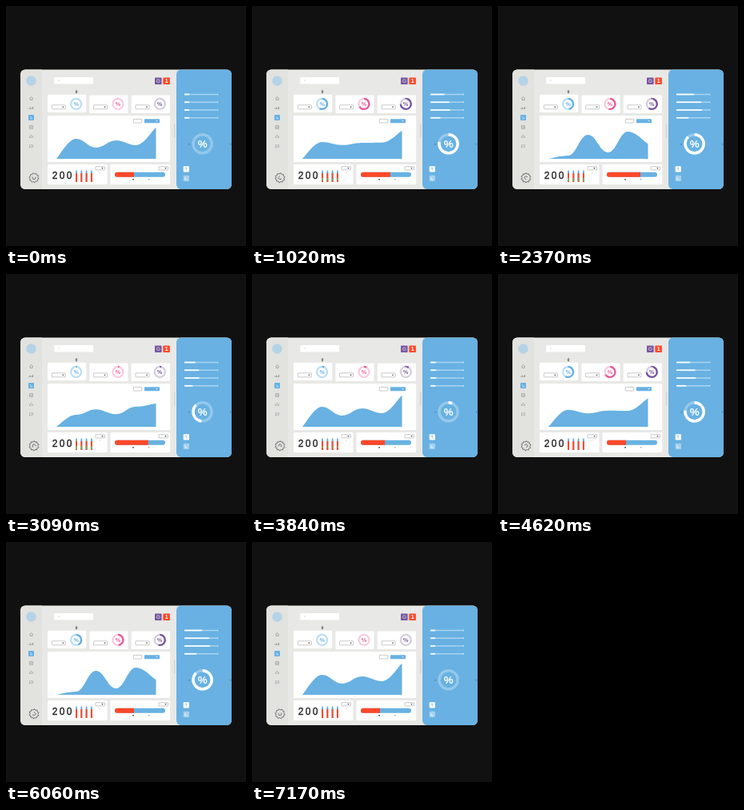
Animation, 300 px wide and 300 px high, one loop 7230 ms. Source, as an HTML page:

```html
<!DOCTYPE html>
<html lang="en">
<head>
<meta charset="utf-8">
<title>Dashboard</title>
<style>
  html, body { margin: 0; width: 100%; height: 100%; overflow: hidden; background: #111; }
  svg { display: block; width: 100%; height: 100%; }
  text { font-family: "Liberation Sans", Arial, sans-serif; }
</style>
</head>
<body>
<svg id="stage" viewBox="0 0 300 300"></svg>
<script>
const LOOP = 7230, CYCLE = LOOP / 2;
const BLUE = '#68b1e2', RED = '#ff4829', PURPLE = '#77579f', PINK = '#e85c9a', DARK = '#343434', GRAY = '#858585';
const stage = document.getElementById('stage');

function add(tag, attrs, text) {
  const el = document.createElementNS('http://www.w3.org/2000/svg', tag);
  for (const name in attrs) el.setAttribute(name, attrs[name]);
  if (text) el.textContent = text;
  return stage.appendChild(el);
}
const box = (x, y, width, height, fill, rx = 0, more = {}) =>
  add('rect', { x, y, width, height, fill, rx, ...more });
const outline = (x, y, w, h) =>
  box(x, y, w, h, '#fff', 0.4, { stroke: '#a5a5a5', 'stroke-width': 0.6 });
const line = (d, stroke, width = 0.6, more = {}) =>
  add('path', { d, stroke, 'stroke-width': width, fill: 'none', ...more });
const shape = (d, fill) => add('path', { d, fill });
const dot = (cx, cy, r, fill) => add('circle', { cx, cy, r, fill });
const label = (x, y, size, fill, text) =>
  add('text', { x, y, fill, 'font-size': size, 'font-weight': 700, 'text-anchor': 'middle' }, text);

function select(x, y, w, h) {
  outline(x, y, w, h);
  shape(`M${x + w - 4.2} ${y + h / 2 - .6}h2.4l-1.2 1.5z`, DARK);
}

function ring(cx, cy, r, width, color, track) {
  const circle = stroke => add('circle', {
    cx, cy, r, fill: 'none', stroke, 'stroke-width': width,
    pathLength: 100, transform: `rotate(-90 ${cx} ${cy})`
  });
  circle(track);
  return circle(color);
}

function setArc(arc, from, to) {
  const size = Math.max(0, to - from);
  arc.setAttribute('stroke-dasharray', `${size} ${size ? 100 - size : 200}`);
  arc.setAttribute('stroke-dashoffset', -from);
}

// Window and sidebar
box(18, 79.5, 264, 149.4, '#e8e8e6', 6);
shape('M24 79.5H45V228.9H24a6 6 0 0 1-6-6V85.5a6 6 0 0 1 6-6z', '#e2e2df');
box(213, 79.5, 69, 149.4, BLUE, 6);
dot(31.5, 93.5, 6.2, '#b5d3e7');

line('M29.4 115.6l2.2-2 2.2 2M30.2 115.2v2.3h2.8v-2.3', GRAY);
line('M29 129v-1.6M30.6 129v-2.4M32.2 129v-1.6M33.6 129v-3', GRAY, 0.8);
box(28, 136, 7, 7, BLUE, 0.8);
line('M30 138l3 3M30.2 141h2.6', '#fff', 0.5);
line('M29.6 149.6h3.8v3.8h-3.8zM30.4 151.5h2.2', GRAY);
line('M29.6 165v-2l1.9-1.6 1.9 1.6v2M31.5 165v-1.5', GRAY);
line('M29.5 177.3v-3.5h4v2.5h-2.6z', '#999');

// A tooth is two steps out and two steps in
const gear = line('M33.2 213.6v1.4a1.8 1.8 0 0 0 3.6 0v-1.4' + Array.from({ length: 40 }, (_, i) => {
  const a = (i + .5) * Math.PI / 20, r = i % 4 < 2 ? 6 : 4.9;
  return `${i ? 'L' : 'M'}${35 + r * Math.cos(a)} ${214.8 + r * Math.sin(a)}`;
}).join('') + 'Z', '#4a4a4a', 0.7);

// Top bar
box(60.3, 89, 48.7, 8.6, '#fff', 0.6);
add('circle', { cx: 66, cy: 93, r: 0.8, fill: 'none', stroke: '#ccc', 'stroke-width': 0.4 });
box(186, 89.6, 8.6, 8.5, PURPLE, 0.8);
add('circle', { cx: 190.3, cy: 93.7, r: 1.9, fill: 'none', stroke: '#e6def0', 'stroke-width': 0.7 });
box(196.3, 89.6, 8.6, 8.5, RED, 0.8);
label(200.6, 96.3, 7, '#fff', '1');

// Cards
const rings = [[BLUE, '#bcdff5'], [PINK, '#f8cddd'], [PURPLE, '#d6cedf']].map(([color, track], i) => {
  const x = 52 + i * 52.35, y = i ? 111.6 : 110.7;
  box(x, y, 48.2, 22.4, '#fff', 1);
  select(x + 5.3, 123.8, 17, 5);
  const arc = ring(x + 35.6, 122.4, 6.5, 2.4, color, track);
  label(x + 35.6, 125, 7.2, color, '%');
  return arc;
});
shape('M86.5 106.7l1.5-1.8 1.5 1.8zM86.5 107.6l1.5 1.8 1.5-1.8z', '#555');

box(52, 137, 153.2, 58, '#fff', 1);
outline(159.3, 141.4, 10.4, 4.6);
box(173, 141.2, 19, 5, BLUE, 0.5);
shape('M187.4 143.2h2.2l-1.1 1.3z', '#fff');
const area = shape('', BLUE);

box(52, 198, 74.5, 25, '#fff', 1);
select(112, 200.7, 11.5, 4.2);
add('text', {
  x: 57.7, y: 216.4, 'font-size': 12, 'letter-spacing': 2.3, fill: '#222', stroke: '#222', 'stroke-width': 0.35
}, '200');
dot(117.7, 208, 0.5, '#aaa');
const bars = [0, 1, 2, 3].map(i => {
  const x = 88 + i * 6.3;
  shape(`M${x - 1} 220V207l1-2.4 1 2.4V220z`, BLUE);
  return { x, red: line('', RED, 2), green: line('', '#7fae62', 2) };
});

box(130.5, 198, 74.7, 25, '#fff', 1);
select(191, 200.7, 11.5, 4.2);
box(136, 207.7, 63, 6.1, BLUE, 3);
const meter = shape('', RED);
dot(159, 216.8, 0.9, DARK);
dot(178.7, 216.8, 0.7, GRAY);
box(210, 147, 1.3, 17.5, '#d2d2d0', 0.6);

// Side panel
const sliders = [16, 25, 26, 9].map((reach, i) => {
  const y = 110.5 + i * 9.75;
  line(`M223 ${y}H265`, '#a9d3ef', 1.4);
  const fill = line('', '#fff', 1.7);
  dot(264.6, y, 0.7, '#d3e8f6');
  return { y, reach, fill };
});
const bigRing = ring(245.6, 172.3, 11.6, 3.4, '#fff', '#94c8ea');
label(245.6, 177, 13.4, '#fff', '%');
shape('M229.5 171.5v2.6l-1.7-1.3zM280 171.5v2.6l1.5-1.3z', '#47799c');
box(221.7, 200.2, 7.3, 7.4, '#fff', 0.8);
line('M224 202.4h2l-1 1.5 1.2 1.7', BLUE, 0.7);
box(221.7, 211.8, 7.3, 7.2, '#a5d1ee', 0.8);
line('M224 214v3h2.5', '#fff', 0.7);

const ease = (t, from, to) => {
  const p = Math.min(1, Math.max(0, (t - from) / (to - from)));
  return (1 - Math.cos(Math.PI * p)) / 2;
};
// Rises from a to b, rests, falls from c to d
const pulse = (t, a, b, c, d) => ease(t, a, b) - ease(t, c, d);

// Two wave poses; every inner point is a crest or trough
const LOW = [191, 166, 177, 168, 174, 152];
const HIGH = [191, 187, 161, 183, 157, 172];
function wave(mix) {
  const step = 25, ys = LOW.map((y, i) => y + (HIGH[i] - y) * mix);
  let d = `M62.5 ${ys[0]}`;
  for (let i = 1; i < ys.length; i++) {
    const x = 62.5 + i * step;
    const c1 = x - step * (i > 1 ? 0.58 : 0.9);
    const c2 = x - step * (i < ys.length - 1 ? 0.42 : 0.1);
    d += `C${c1} ${ys[i - 1]} ${c2} ${ys[i]} ${x} ${ys[i]}`;
  }
  return d + 'V191H62.5Z';
}

function draw(t) {
  const c = t % CYCLE;
  area.setAttribute('d', wave(pulse(c, 700, 1800, 2600, 3560)));

  const fill = pulse(c, 0, 1000, 2000, 3300);
  rings.forEach((arc, i) => setArc(arc, 0, fill * (58 + i * 8)));
  setArc(bigRing, 88 * ease(c, 2500, 3560), 88 * ease(c, 0, 1300));

  const slide = pulse(c, 0, 1600, 2600, 3560);
  for (const s of sliders) s.fill.setAttribute('d', `M223 ${s.y}h${6 + s.reach * slide}`);

  const surge = pulse(t, 0, 1600, 3000, 4400);
  meter.setAttribute('d', `M139.05 207.7H${160 + 18 * surge}v6.1H139.05a3.05 3.05 0 0 1 0-6.1z`);
  for (const { x, red, green } of bars) {
    red.setAttribute('d', `M${x} 220V209`);
    green.setAttribute('d', `M${x} ${216 - surge}v${4 * surge}`);
  }
  gear.setAttribute('transform', `rotate(${360 * t / LOOP} 35 214.8)`);
}

const start = performance.now();
function tick() {
  draw((performance.now() - start) % LOOP);
  requestAnimationFrame(tick);
}
draw(0);
requestAnimationFrame(tick);
</script>
</body>
</html>
```
